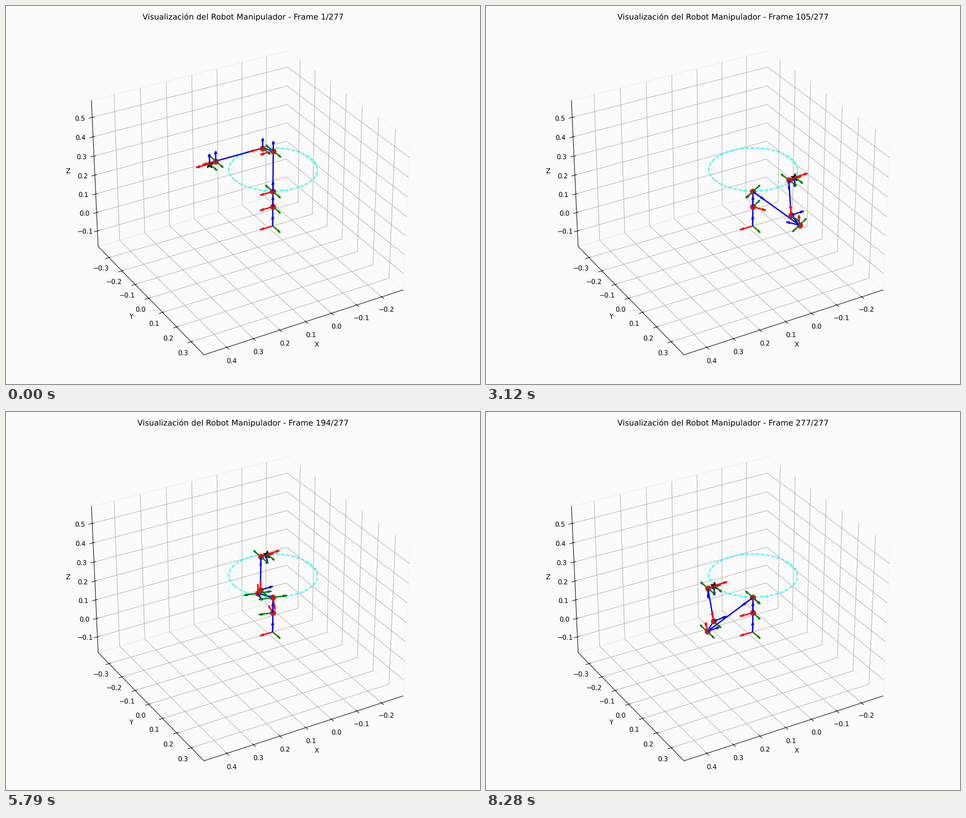
A matplotlib script for the animation above (8310 ms loop, 837 px wide and 669 px high).

```python
import numpy as np
import matplotlib.pyplot as plt
from matplotlib.animation import FuncAnimation
from mpl_toolkits.mplot3d.art3d import Line3DCollection

plt.rcParams["text.hinting"] = "none"

W, H, DPI = 837, 669, 83.7
N, APPROACH = 277, 8          # frames in the loop, frames from home to the circle
STEP = 2 * np.pi / 269
RADIUS, HEIGHT = 0.15, 0.3
AXIS_LEN, HEAD = 0.05, 0.3
BACK = "#fbfbfb"

BASE, SHOULDER, ARM = 0.103, 0.08, 0.21
ELBOW = np.array([0.0415, 0, 0.03])
FOREARM = np.array([0.18, 0, 0])
HAND = np.array([0.0237, 0, -0.0055])
TOOL = np.diag([-1.0, 1.0, -1.0])


def rot(axis, a):
    i, j = {"x": (1, 2), "y": (2, 0), "z": (0, 1)}[axis]
    m = np.eye(3)
    m[i, i] = m[j, j] = np.cos(a)
    m[i, j], m[j, i] = -np.sin(a), np.sin(a)
    return m


def solve(theta):
    """Joint angles that put the tool on the circle, pointing down."""
    tip = np.array([RADIUS * np.cos(theta), RADIUS * np.sin(theta), HEIGHT])
    x, y, z = tip - TOOL @ HAND
    q1 = np.arctan2(y, x)
    r, z = np.hypot(x, y), z - BASE - SHOULDER
    fx, fz = ELBOW[0] + FOREARM[0], ELBOW[2]
    dist2 = r * r + z * z
    cos_a = (ARM**2 + dist2 - fx**2 - fz**2) / (2 * ARM * np.sqrt(dist2))
    lift = np.arctan2(z, r) - np.arccos(cos_a)
    tilt = np.arctan2(z - ARM * np.sin(lift), r - ARM * np.cos(lift)) - np.arctan2(fz, fx)
    r3 = rot("z", q1) @ rot("y", -tilt)
    m = r3.T @ TOOL[:, 0]
    q4 = np.arctan2(-m[1], m[2])
    q5 = np.arctan2(-np.hypot(m[1], m[2]), m[0])
    w = (r3 @ rot("x", q4) @ rot("y", q5)).T @ TOOL
    q6 = np.arctan2(w[2, 1], w[1, 1])
    return np.array([q1, np.pi / 2 - lift, tilt, q4, q5, q6])


def joints(i):
    if i < APPROACH:
        return solve(0) * (1 - (1 - i / APPROACH) ** 2)
    return solve((i - APPROACH) * STEP)


def chain(q):
    """Rotation and origin of every link frame."""
    r1 = rot("z", q[0])
    r2 = r1 @ rot("y", q[1])
    r3 = r1 @ rot("y", -q[2])
    r4 = r3 @ rot("x", q[3])
    r5 = r4 @ rot("y", q[4])
    r6 = r5 @ rot("x", q[5])
    moves = [[0, 0, 0], [0, 0, BASE], [0, 0, SHOULDER], r2 @ [0, 0, ARM],
             r3 @ ELBOW, r4 @ FOREARM, r6 @ HAND]
    return [np.eye(3), r1, r2, r3, r4, r5, r6], np.cumsum(moves, axis=0)


def arrow(p, v):
    flat = np.hypot(v[0], v[1])
    a = np.array([v[1], -v[0], 0]) / flat if flat > 1e-9 else np.array([0, 1, 0])
    side = np.cross(a, v) * np.sin(np.radians(15))
    back = v * np.cos(np.radians(15))
    tip = p + AXIS_LEN * v
    k = HEAD * AXIS_LEN
    return [(p, tip), (tip, tip - k * (back + side)), (tip, tip - k * (back - side))]


def arrows(rots, pts):
    items = []
    for n, (r, p) in enumerate(zip(rots, pts)):
        items += [(p, r[:, k], c) for k, c in enumerate(("red", "green", "blue"))]
        if n in (2, 3, 5):      # hinge axis
            items.append((p, -r[:, 1], "green"))
    items.sort(key=lambda it: (it[0] + it[1] * AXIS_LEN / 2) @ EYE)
    segs = [s for p, v, _ in items for s in arrow(p, v)]
    return segs, [c for *_, c in items for _ in range(3)]


EYE = np.array([0.433, 0.75, 0.375])
SIDE, TOP = 626, 30.9

fig = plt.figure(figsize=(W / DPI, H / DPI), dpi=DPI, facecolor=BACK)
ax = fig.add_axes([(W - SIDE) / 2 / W, (H - TOP - SIDE) / H, SIDE / W, SIDE / H],
                  projection="3d", elev=30, azim=60, facecolor=BACK)
half, mid_x, mid_z = 0.3858, 0.099, 0.2
ax.set(xlim=(mid_x - half, mid_x + half), ylim=(-half, half),
       zlim=(mid_z - half, mid_z + half), xlabel="X", ylabel="Y", zlabel="Z")
for axis in (ax.xaxis, ax.yaxis, ax.zaxis):
    axis.pane.fill = False

t = np.linspace(0, 2 * np.pi, 100)
ax.plot(RADIUS * np.cos(t), RADIUS * np.sin(t), np.full_like(t, HEIGHT),
        "--", color="cyan", lw=1.5)
links, = ax.plot([], [], [], color="blue", lw=2)
dots, = ax.plot([], [], [], "o", color="red", ms=8)
star, = ax.plot([], [], [], "*", color="black", ms=12)
triads = Line3DCollection([[(0, 0, 0), (0, 0, 1)]], linewidths=2)
ax.add_collection3d(triads)
title = fig.suptitle("")


def update(i):
    rots, pts = chain(joints(i))
    links.set_data_3d(*pts.T)
    dots.set_data_3d(*pts[1:-1].T)
    star.set_data_3d(*pts[-1:].T)
    segs, colors = arrows(rots, pts)
    triads.set_segments(segs)
    triads.set_color(colors)
    title.set_text(f"Visualización del Robot Manipulador - Frame {i + 1}/{N}")
    return links, dots, star, triads, title


anim = FuncAnimation(fig, update, frames=N, interval=30, repeat=True, repeat_delay=0)
plt.show()
```
